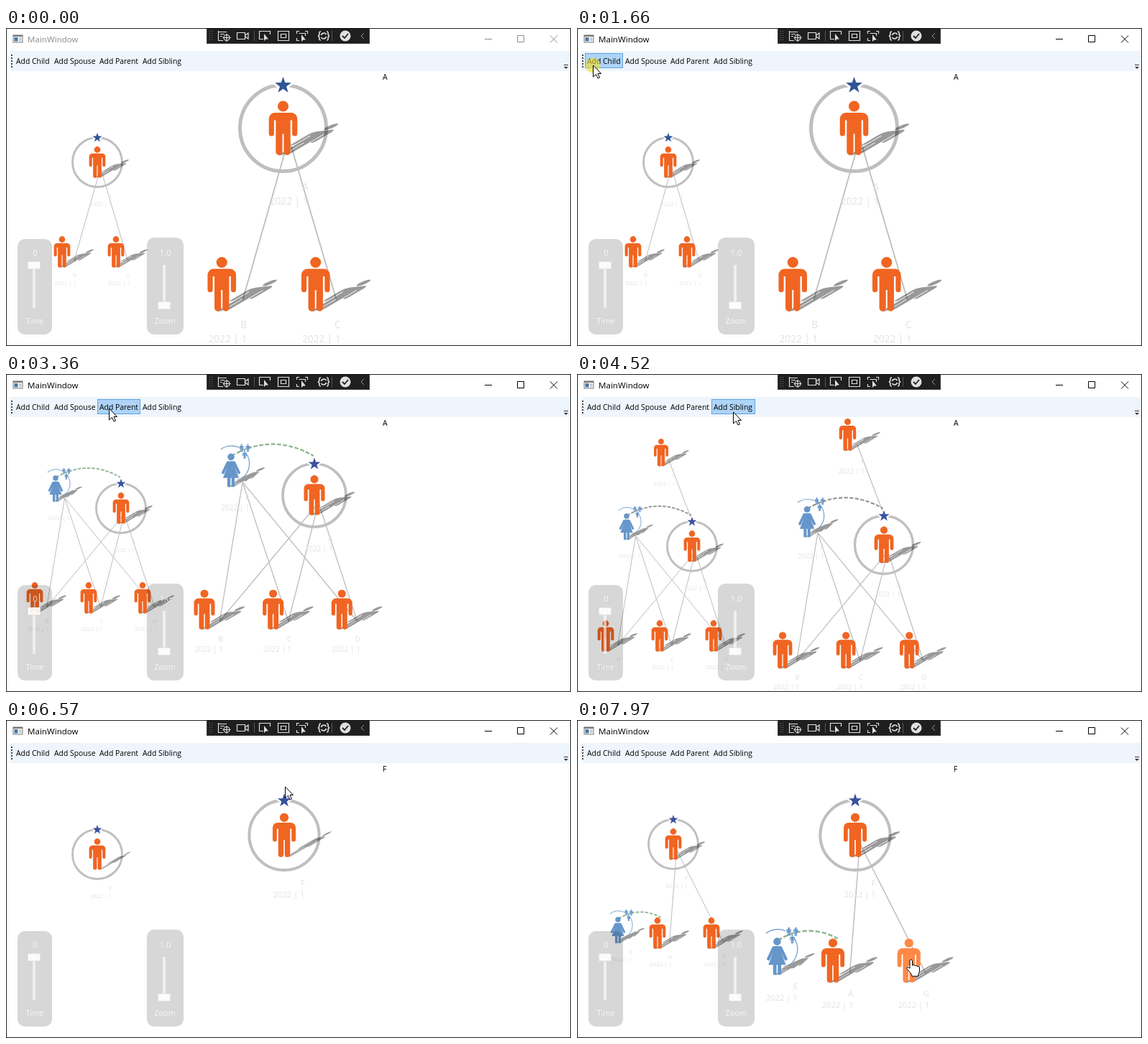
Recreate the animation shown at these times as an HTML page with a canvas. Size 786 by 443 pixels, loop 8 s.

```html
<!DOCTYPE html>
<html lang="en">
<head>
<meta charset="utf-8">
<title>Family tree</title>
<style>
html, body { margin: 0; width: 100%; height: 100%; overflow: hidden; background: #fff; }
canvas { display: block; }
</style>
</head>
<body>
<canvas id="stage" width="786" height="443"></canvas>
<script>
const c = document.getElementById('stage').getContext('2d');
const LOOP = 8000, UNIT = 1.74;
const ORANGE = '#f06522', HOT = '#ff8845', BLUE = '#6696ca';

// ---- shapes, centred on the figure ----
const man = new Path2D();
man.arc(0, -30.5, 7.6, 0, 7);
man.roundRect(-19.8, -21.5, 39.6, 10.5, [8.5, 8.5, 0, 0]);
for (const x of [-19.8, 12.6]) man.roundRect(x, -13, 7.2, 24, [0, 0, 3.6, 3.6]);
man.rect(-10.2, -13, 20.4, 21);
for (const x of [-10.2, 1]) man.roundRect(x, 0, 9.2, 37.5, [0, 0, 4.5, 4.5]);

const woman = new Path2D('M-6-18H6Q8-18 9-15L18 4Q16 8 13 6L7-7 15 14H7V31H1V14H-1V31H-7V14H-15L-7-7-13 6Q-16 8-18 4L-9-15Q-8-18-6-18Z');
woman.arc(0, -26, 6.5, 0, 7);

const star = new Path2D();
for (let i = 0; i < 10; i++) {
  const r = i % 2 ? 4.8 : 12, a = i * Math.PI / 5;
  star.lineTo(r * Math.sin(a), -r * Math.cos(a));
}
star.closePath();

const arrow = new Path2D('M0 0V16L4 12.500 6.500 18 9 17 6.500 11.500H11Z');
const hand = new Path2D('M0 1.500C0-.5 3.500-.5 3.500 1.500V8C5 6.500 7 7 7 8.500 8.500 7.500 10.500 8 10.500 9.500 12 8.800 13.500 9.500 13.500 11V15C13.500 18 11.500 19 11.500 23H3C3 20-2 15-4 12.500-5 11-3 9.500 0 12Z');

// ---- trees: overview positions, main view scale and root position ----
const row = (names, x, y) => Object.fromEntries([...names].map((n, i) => [n, [x + 75 * i, y]]));
const shared = ['AB', 'AC', 'AD', 'EB', 'EC', 'ED'];
const withParent = {
  from: 3430, full: 3710, root: 'A', s: 1.175, at: [427, 238], fresh: 'F', bond: '#8c968c',
  nodes: { F: [117, 109.5], E: [69, 213], A: [160, 240], ...row('BCD', 40, 365) },
  edges: ['FA', ...shared]
};
const scenes = [
  { from: 0, full: 0, root: 'A', s: 1.74, at: [385.5, 139.5], fresh: '',
    nodes: { A: [127, 187], ...row('BC', 78, 312) }, edges: ['AB', 'AC'] },
  { from: 1720, full: 2130, root: 'A', s: 1.275, at: [387.5, 169], fresh: 'D',
    nodes: { A: [127, 187], ...row('BCD', 40, 312) }, edges: ['AB', 'AC', 'AD'] },
  { from: 2610, full: 3020, root: 'A', s: 1.275, at: [429, 169], fresh: 'E', bond: '#8fb48f',
    nodes: { E: [69, 160], A: [160, 187], ...row('BCD', 40, 312) }, edges: shared },
  withParent,
  { ...withParent, from: 4590, full: 5130, fresh: '' },
  { from: 6010, full: 6010, root: '', nodes: {}, edges: [] },
  { from: 6070, start: 6630, full: 7370, root: 'F', s: 1.41, at: [387, 160.5], fresh: 'AGE', bond: '#8fb48f',
    nodes: { F: [134, 173], E: [57, 293], ...row('AG', 112, 297) }, edges: ['FA', 'FG'] }
];

// cursor: time, x, y
const path = [
  [330, 686, 391], [790, 92, 50], [990, 92, 50], [1190, 22, 52], [2150, 22, 52], [2260, 88, 47],
  [3270, 88, 47], [3350, 143, 48], [3940, 143, 48], [4050, 217, 53], [4600, 217, 53], [5130, 277, 122],
  [5940, 388, 93], [6630, 388, 93], [7370, 453, 322], [7570, 464, 334], [LOOP, 464, 334]
];
const clicks = [[1330, 1720], [6010, 6570]];
const buttons = [['Add Child', 11, 53], ['Add Spouse', 64, 63], ['Add Parent', 127, 60], ['Add Sibling', 187, 61]];

// ---- helpers ----
const clamp = v => Math.max(0, Math.min(1, v));
const within = (t, a, b) => t >= a && t < b;
const hotNode = t => within(t, 5780, 6010) ? 'F' : t >= 7440 ? 'G' : '';

function text(str, x, y, size, color, align = 'left') {
  c.font = size + 'px "Open Sans", "Noto Sans", sans-serif';
  c.textAlign = align;
  c.textBaseline = 'alphabetic';
  c.fillStyle = color;
  c.fillText(str, x, y);
}
function box(x, y, w, h, fill, r = 0) {
  c.fillStyle = fill;
  c.beginPath();
  c.roundRect(x, y, w, h, r);
  c.fill();
}
function frame(x, y, w, h, color) {
  c.strokeStyle = color;
  c.lineWidth = 1;
  c.strokeRect(x + 0.5, y + 0.5, w - 1, h - 1);
}
function stroke(d, color, width = 1) {
  c.strokeStyle = color;
  c.lineWidth = width;
  c.stroke(new Path2D(d));
}
function local(x, y, k, draw) {
  c.save();
  c.translate(x, y);
  c.scale(k, k);
  draw();
  c.restore();
}

// ---- tree ----
function spouseMark() {
  c.strokeStyle = BLUE;
  c.lineWidth = 1.5;
  for (const [a, b] of [[-127, -66], [-36, 55]]) {
    c.beginPath();
    c.arc(1, -13, 34, a * Math.PI / 180, b * Math.PI / 180);
    c.stroke();
  }
  c.fillStyle = BLUE;
  for (const [x, y] of [[20, -43], [32, -43], [26, -30]]) local(x, y, 0.2, () => c.fill(man));
}

function drawTree(scene, t, s, [ax, ay], hot) {
  const { nodes, root, fresh } = scene;
  const k = s / UNIT, start = scene.start || scene.from;
  const fade = scene.full > start ? clamp((t - start) / (scene.full - start)) : 1;
  const alpha = n => fresh.includes(n) ? fade : 1;
  // a parent above the root is drawn smaller
  const size = n => n === 'F' && n !== root ? 0.88 : 1;
  const place = (n, dx = 0, dy = 0) => [
    ax + (nodes[n][0] - nodes[root][0]) * s + dx * k * size(n),
    ay + (nodes[n][1] - nodes[root][1]) * s + dy * k * size(n)
  ];
  const each = draw => {
    for (const n in nodes) {
      c.globalAlpha = alpha(n);
      local(...place(n), k, () => draw(n, size(n)));
    }
    c.globalAlpha = 1;
  };

  local(ax, ay, k, () => {
    c.strokeStyle = '#bfbfbf';
    c.lineWidth = 5;
    c.beginPath();
    c.arc(0, 0, 60, 0, 7);
    c.stroke();
  });

  c.globalAlpha = fade;
  c.strokeStyle = '#bdbdbd';
  c.lineWidth = s;
  for (const [a, b] of scene.edges) {
    c.beginPath();
    c.moveTo(...(a === root ? place(a, 8, 14) : place(a, 22, 22)));
    c.lineTo(...(b === root ? place(b, -3, -70) : place(b, 29, 22)));
    c.stroke();
  }
  if (nodes.E) {
    const [x1, y1] = place('E', 1, -28);
    const [x2, y2] = root === 'A' ? place('A', 0, -74) : place('A', 8, -38);
    c.strokeStyle = scene.bond;
    c.lineWidth = s * 1.8;
    c.setLineDash([s * 4.5, s * 2]);
    c.beginPath();
    c.moveTo(x1, y1);
    c.quadraticCurveTo((x1 + x2) / 2, (y1 + y2) / 2 - 0.29 * (x2 - x1), x2, y2);
    c.stroke();
    c.setLineDash([]);
  }

  // cast shadows, sheared about the feet
  each((n, k) => {
    const foot = n === 'E' ? 31 : 37.5, thin = root === 'F' && n === 'F' && t < 6700;
    c.scale(k, k);
    c.translate(thin ? 6 : 0, foot);
    c.transform(thin ? 0.5 : 0.85, -0.1, -0.98, 0.58, 0, 0);
    c.translate(0, -foot);
    c.fillStyle = 'rgba(0,0,0,.4)';
    c.fill(n === 'E' ? woman : man);
  });
  each((n, k) => {
    c.scale(k, k);
    c.fillStyle = n === 'E' ? BLUE : n === hot ? HOT : ORANGE;
    c.fill(n === 'E' ? woman : man);
    if (n === 'E') spouseMark();
  });
  each(n => {
    const y = (n === root ? 47 : n === 'E' ? 29 : 32) * UNIT + 5;
    text(n, 35, y, 13.7, '#e2e2e2', 'right');
    text('2022 | 1', 35, y + 20, 13.7, '#e2e2e2', 'right');
  });

  local(ax, ay - 59.5 * k, k, () => {
    c.strokeStyle = '#fff';
    c.lineWidth = 6;
    c.stroke(star);
    c.fillStyle = t < 1720 ? '#2f5597' : '#3a52a0';
    c.fill(star);
  });
}

// ---- window ----
function slider(x, y, w, h, cx, knobY, value, name) {
  const ink = 'rgba(255,255,255,.8)';
  box(x, y, w, h, 'rgba(0,0,0,.155)', 10);
  box(cx - 2, 330, 4, 60, 'rgba(255,255,255,.6)');
  box(cx - 9, knobY, 18, 11, 'rgba(255,255,255,.9)');
  frame(cx - 9, knobY, 18, 11, '#e4e4e4');
  text(value, cx + 1.5, 317, 11.5, ink, 'center');
  text(name, cx + 1, 412, 10.8, ink, 'center');
}

function drawBars(t, hover) {
  const ink = t < 1330 ? '#8c8c8c' : '#000';
  box(9.5, 9.5, 14, 11, '#777');
  box(10.5, 12, 12, 7.5, '#fff');
  box(11.5, 13, 5, 5.5, '#4779a8');
  box(18, 13, 3.5, 5.5, '#ccc');
  text('MainWindow', 30, 20, 11.6, ink);
  stroke('M666 15.500H676M711.500 10.500H720.500V19.500H711.500ZM757 10.500 767 20.500M767 10.500 757 20.500', ink);

  box(5, 32, 779, 28, '#eef5fc', 3);
  for (let y = 37; y < 54; y += 4) box(7, y, 2, 2, '#444');
  stroke('M776 51.500H782', '#333');
  c.fillStyle = '#333';
  c.fill(new Path2D('M776 54H782L779 57Z'));
  for (const [name, x, w] of buttons) {
    if (name === hover) {
      box(x, 35, w, 21, '#aed4f8');
      frame(x, 35, w, 21, '#62a3de');
    }
    text(name, x + 3, 50, 10.4, '#000');
  }
}

function drawTools() {
  box(279, 0, 227, 22, '#1f1f1f');
  frame(279, -1, 227, 23, '#3d3d3d');
  for (let y = 4; y < 19; y += 3) for (const x of [283, 286]) box(x, y, 1, 1, '#777');
  stroke('M345.500 4V18M453.500 4V18', '#555');
  stroke('M295 5.500H307M295.500 4V17.500H302M298 8.500H304M298 11.500H301M311 13.500A4 4 0 1 1 303 13.500A4 4 0 1 1 311 13.500M307 8V19M301.500 13.500H312.500' +
    'M321.500 6.500H332.500V15.500H321.500ZM333 10 337 7V15L333 12M358 15.500H352.500V4.500H367.500V9' +
    'M378.500 4.500H393.500V17.500H378.500ZM382.500 8.500H389.500V13.500H382.500Z' +
    'M404.500 8V4.500H408M416 4.500H419.500V8M404.500 14V17.500H408M407.500 7.500H416.500V11', '#e0e0e0', 1.2);
  stroke('M438 5Q435 5 436 9L434.500 11 436 13Q435 17 438 17M446 5Q449 5 448 9L449.500 11 448 13Q449 17 446 17' +
    'M438.500 10A3.800 3.800 0 0 1 445.500 9M445.500 12A3.800 3.800 0 0 1 438.500 13', '#e0e0e0', 1.6);
  c.fillStyle = '#e0e0e0';
  c.fill(new Path2D('M359 8V18L361.500 15.500H365ZM411 9V19L413.500 16.500H417Z'));
  c.beginPath();
  c.arc(472, 11, 7.5, 0, 7);
  c.fill();
  stroke('M468 11 471 14 476 8', '#1f1f1f', 1.8);
  stroke('M498 7 494 11 498 15', '#999');
}

function cursorAt(t) {
  const i = path.findIndex(p => p[0] > t);
  const [t0, x0, y0] = path[i - 1], [t1, x1, y1] = path[i], f = (t - t0) / (t1 - t0);
  return [x0 + (x1 - x0) * f, y0 + (y1 - y0) * f];
}

function drawCursor(t, [x, y], pointing) {
  if (clicks.some(([a, b]) => within(t, a, b))) {
    c.fillStyle = 'rgba(240,220,40,.62)';
    c.beginPath();
    c.arc(x, y, 10.5, 0, 7);
    c.fill();
  }
  const shape = pointing ? hand : arrow;
  local(pointing ? x - 1 : x + 0.5, y, 1, () => {
    c.fillStyle = '#fff';
    c.fill(shape);
    c.strokeStyle = '#000';
    c.lineWidth = 1;
    c.stroke(shape);
  });
}

function draw(t) {
  const scene = scenes.findLast(s => t >= s.from);
  const pos = t >= 330 ? cursorAt(t) : null;
  const hit = pos && within(pos[1], 35, 56) && buttons.find(([, x, w]) => within(pos[0], x, x + w));
  const hot = hotNode(t);
  box(0, 0, 786, 443, '#fff');

  if (scene.root) {
    let [x, y] = scene.nodes[scene.root];
    if (scene.root === 'F' && t < 7970) [x, y] = t < 6630 ? [127, 187] : [x + 3, y - 6];
    drawTree(scene, t, 1, [x, y]);
    drawTree(scene, t, scene.s, scene.at, hot);
  }
  slider(16, 294, 48, 133, 39, 325, '0', 'Time');
  slider(196, 292, 51, 135, 220, 381, '1.0', 'Zoom');
  text(t < 6010 ? 'A' : 'F', 524, 72, 10.4, '#000');

  drawBars(t, hit && hit[0]);
  frame(0, 0, 786, 443, '#222');
  drawTools();
  if (pos) drawCursor(t, pos, hot);
}

function tick() {
  draw(performance.now() % LOOP);
  requestAnimationFrame(tick);
}
tick();
</script>
</body>
</html>
```
